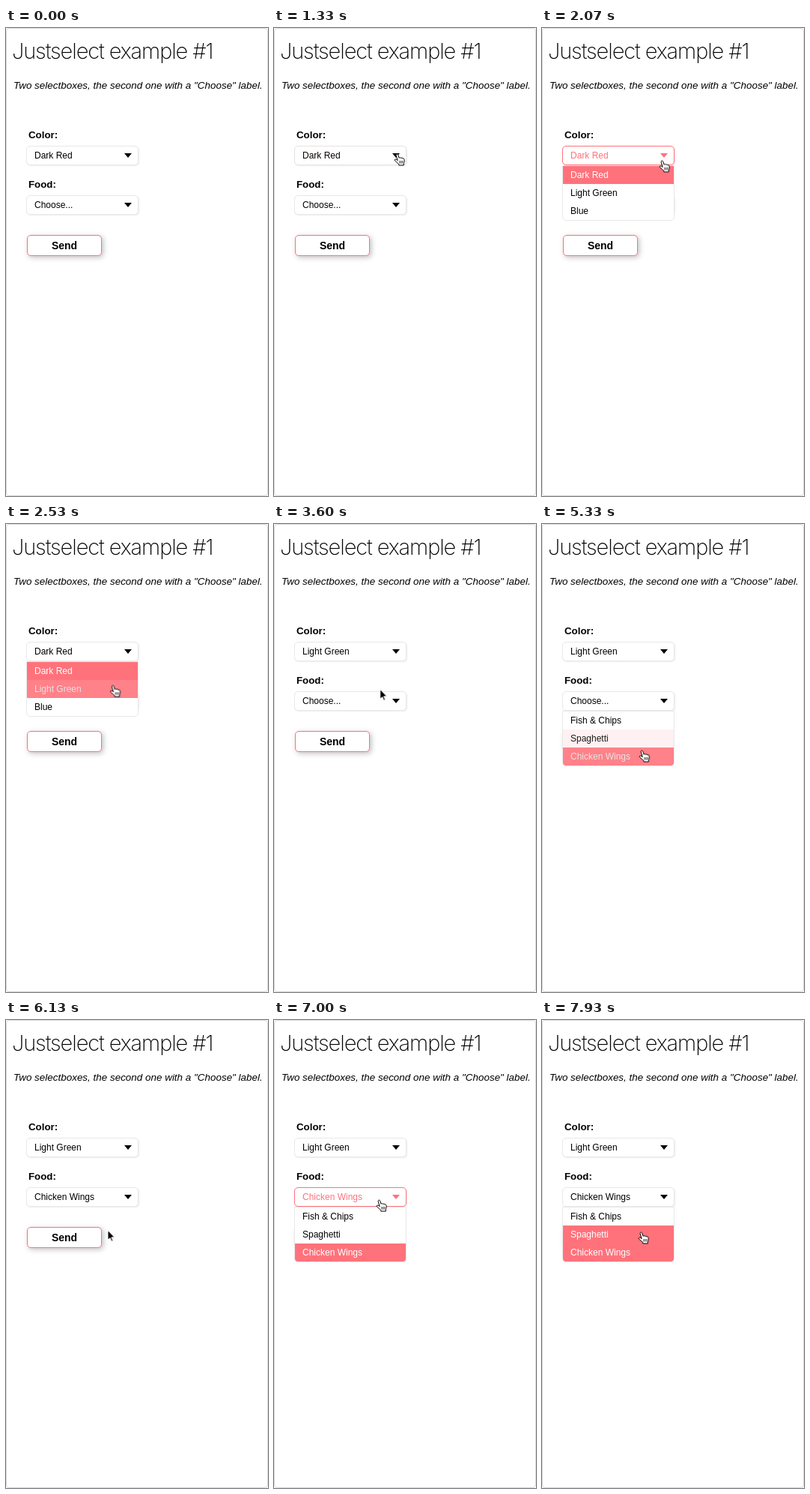
An HTML page that plays this animation: 350 by 624 pixels, repeating every 8000 ms.

```html
<!DOCTYPE html>
<html lang="en">
<head>
<meta charset="utf-8">
<title>Justselect example #1</title>
<style>
:root { --red: #ff727b; --line: #e8e8e8; }
* { box-sizing: border-box; }
html, body { margin: 0; width: 100%; height: 100%; overflow: hidden; background: #fff; }
body { font: 12px/24px "Liberation Sans", Arial, sans-serif; color: #000; }
.page { position: absolute; left: 0; top: 0; width: 350px; height: 624px; overflow: hidden; border: 1px solid #d9d9d9; border-radius: 4px; }
.stage { position: absolute; left: -1px; top: -1px; width: 350px; height: 624px; }
.stage > * { position: absolute; margin: 0; white-space: nowrap; }
h1 { left: 8px; top: 11px; font: 200 29px/40px Inter, Roboto, sans-serif; letter-spacing: -1.1px; }
.intro { left: 10px; top: 65px; font-size: 13.45px; font-style: italic; }
.label { left: 30px; font-size: 13.3px; font-weight: bold; }
.send { left: 28px; top: 276px; width: 100px; height: 28px; border: 1px solid var(--red); border-radius: 5px; background: #fff; box-shadow: 2px 2px 7px rgba(0, 0, 0, .25); font-size: 14px; font-weight: bold; line-height: 27px; text-align: center; }

.select { left: 27px; width: 150px; height: 26px; padding-left: 10px; border: 1px solid var(--line); border-radius: 5px; background: #fff; box-shadow: 1px 1px 2px rgba(0, 0, 0, .08); }
.select::after { content: ""; position: absolute; right: 8px; top: 9px; border: 5px solid transparent; border-top: 6px solid currentColor; border-bottom: 0; }
.select span { position: absolute; }
.menu { left: 27px; width: 150px; height: 74px; border: 1px solid var(--line); border-radius: 0 0 5px 5px; background: #fff; overflow: hidden; }
.menu div { height: 24px; padding-left: 10px; }
.on { background: var(--red); color: #fff; }
.cursor { left: 0; top: 0; width: 18px; height: 20px; overflow: visible; fill: #fff; stroke: #000; }

/* one loop is 8 s, so 1% is 80 ms */
.stage * { animation: 8s ease infinite; }
.color { animation-name: color-hover; }
.food { animation-name: food-hover; }
.green { animation-name: green; }
.fish { animation-name: fish; }
.spaghetti { animation-name: spaghetti; }
.wings { animation-name: wings; }
.stage .cursor { animation: move 8s ease-in-out infinite, seen 8s step-end infinite; }
.stage :is(.menu, .select span, .cursor g) { animation-timing-function: step-end; }
.color-menu { animation-name: color-open; }
.food-menu { animation-name: food-open; }
.dark { animation-name: until-color; }
.light { animation-name: from-color; }
.none { animation-name: until-food; }
.picked { animation-name: from-food; }
.hand { animation-name: hand; }
.arrow { animation-name: arrow; }

@keyframes color-hover {
  0%, 16.5%, 29.2%, 100% { color: #000; border-color: var(--line); }
  18.75%, 26.7% { color: var(--red); border-color: var(--red); }
}
@keyframes food-hover {
  0%, 45.4%, 63.1%, 79.25%, 96.25%, 100% { color: #000; border-color: var(--line); }
  47.9%, 60.6%, 81.75%, 93.75% { color: var(--red); border-color: var(--red); }
}
@keyframes green {
  0%, 30.1% { background: #fff; color: #000; }
  32.6%, 100% { background: var(--red); color: #fff; }
}
@keyframes fish {
  0%, 60.6%, 65.4%, 93.75%, 99%, 100% { background: #fff; color: #000; }
  62.9%, 96.5% { background: var(--red); color: #fff; }
}
@keyframes spaghetti {
  0%, 62.6%, 67.6%, 96.5% { background: #fff; color: #000; }
  65.1%, 99%, 100% { background: var(--red); color: #fff; }
}
@keyframes wings {
  0%, 65.1% { background: #fff; color: #000; }
  67.6%, 100% { background: var(--red); color: #fff; }
}
@keyframes color-open {
  0%, 36.6% { visibility: hidden; }
  21.6% { visibility: visible; }
}
@keyframes food-open {
  0%, 70.85% { visibility: hidden; }
  53.35%, 87.45%, 100% { visibility: visible; }
}
@keyframes until-color { 0% { opacity: 1; } 36.6%, 100% { opacity: 0; } }
@keyframes from-color { 0% { opacity: 0; } 36.6%, 100% { opacity: 1; } }
@keyframes until-food { 0% { opacity: 1; } 70.85%, 100% { opacity: 0; } }
@keyframes from-food { 0% { opacity: 0; } 70.85%, 100% { opacity: 1; } }
@keyframes seen { 0% { opacity: 0; } 12.45%, 100% { opacity: 1; } }
@keyframes hand {
  0%, 36.65%, 70.85% { opacity: 0; }
  16%, 45.4%, 79.25%, 100% { opacity: 1; }
}
@keyframes arrow {
  0%, 36.65%, 70.85% { opacity: 1; }
  16%, 45.4%, 79.25%, 100% { opacity: 0; }
}
@keyframes move {
  0%, 12.45% { transform: translate(300px, 240px); animation-timing-function: ease-out; }
  16.6%, 23.1% { transform: translate(160px, 167px); }
  32.5%, 43.4% { transform: translate(138px, 215px); }
  48.75%, 58.1% { transform: translate(134px, 241px); }
  67.5%, 73.4% { transform: translate(129px, 302px); }
  81.25%, 90.6% { transform: translate(136px, 239px); }
  99%, 100% { transform: translate(128px, 282px); }
}
</style>
</head>
<body>
<div class="page"><div class="stage">
  <h1>Justselect example #1</h1>
  <p class="intro">Two selectboxes, the second one with a "Choose" label.</p>
  <div class="label" style="top:131px">Color:</div>
  <div class="select color" style="top:157px"><span class="dark">Dark Red</span><span class="light">Light Green</span></div>
  <div class="label" style="top:197px">Food:</div>
  <div class="send">Send</div>
  <div class="select food" style="top:223px"><span class="none">Choose...</span><span class="picked">Chicken Wings</span></div>
  <div class="menu color-menu" style="top:183px">
    <div class="on">Dark Red</div><div class="green">Light Green</div><div>Blue</div>
  </div>
  <div class="menu food-menu" style="top:249px">
    <div class="fish">Fish &amp; Chips</div><div class="spaghetti">Spaghetti</div><div class="wings">Chicken Wings</div>
  </div>
  <svg class="cursor" viewBox="0 0 18 20">
    <g class="hand">
      <path d="M5.2 9.6 3.2 3C2.7 1 5 .2 5.7 2.2L7.2 6.4C7.6 5.2 9.4 5.3 9.6 6.6 10.2 5.6 11.8 5.9 11.9 7.2 12.8 6.5 14 7.1 14.1 8.4 14.3 10.6 14.2 12 13.3 13.6V16H6.8V14.6C5.4 13.4 3.6 11.6 1.6 10 .4 8.8 1.8 7.5 3.2 8.2Z"/>
      <path d="M7.9 10v3.6M9.9 10v3.6M11.9 10v3.6" stroke-width=".8"/>
    </g>
    <g class="arrow"><path d="M4.5.5v13l3-2.8 2 4.6 2-.9-2-4.5h4Z" fill="#000" stroke="#fff"/></g>
  </svg>
</div></div>
</body>
</html>
```
